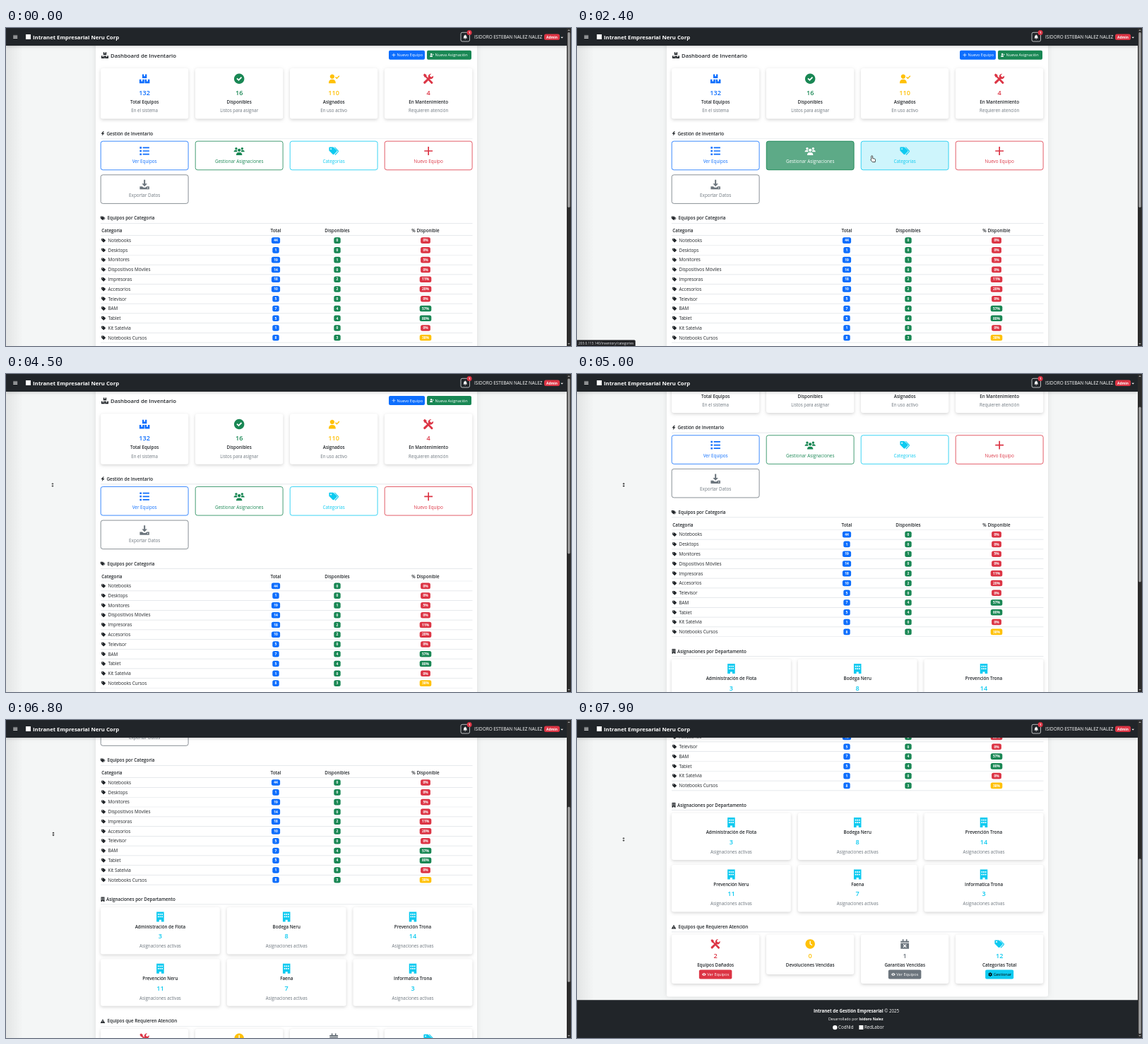
Animation of 800 by 450 pixels, one loop 8 s. Source, as an HTML page with a canvas:

```html
<!DOCTYPE html>
<html lang="es">
<head>
<meta charset="utf-8">
<title>Inventario</title>
<style>
html, body { margin: 0; width: 100%; height: 100%; overflow: hidden; background: #f4f6f6; }
canvas { display: block; width: 800px; height: 450px; }
</style>
</head>
<body>
<canvas id="stage" width="800" height="450"></canvas>
<script>
const ctx = document.getElementById('stage').getContext('2d');
const LOOP = 8000, MAX_SCROLL = 345.4;
const BLUE = '#0d6efd', GREEN = '#198754', YELLOW = '#ffc107', RED = '#dc3545',
  CYAN = '#0dcaf0', GRAY = '#6c757d', DARK = '#212529', LINE = '#dee2e6', WHITE = '#fff';
const COLS = [134, 268, 402, 536], CARD_W = 124.3;

// Icons live in a 16-unit box; "|" separates layers that overlap.
const user = 'M5.5 1a3.5 3.5 0 1 0 .01 0zM0 15c0-4 2-6 5.5-6s5.5 2 5.5 6z';
const ICONS = {
  boxes: 'M4.5 1H7v3h2V1h2.5v6h-7zM0 9h2.8v3h2V9h2.8v6H0zM8.4 9h2.8v3h2V9H16v6H8.4z',
  check: 'M8 0a8 8 0 1 0 .01 0zM3.8 8.2l1.4-1.4 2 2L11 5l1.4 1.4-5.2 5.2z',
  userCheck: user + 'M10 6l1.2-1.2 1.6 1.6L16 3l1 1.2-4.2 4.4z',
  userPlus: user + 'M12.2 4h1.6v2H16v1.6h-2.2v2h-1.6v-2H10V6h2.2z',
  tools: 'M2 0l3 2.2v2l9.5 9a1.5 1.5 0 0 1-2.4 2.2L3.4 5.6H2L0 2z|M15.6 3.2L13 5.4l-2.2-.8-.6-2.2L12.6.2a4.4 4.4 0 0 0-4.8 6l-7 6.4a1.8 1.8 0 0 0 2.6 2.6L10 8.4a4.4 4.4 0 0 0 5.6-5.2z',
  bolt: 'M10 0L2 9h5l-2 7 9-9.5H9L12 0z',
  list: 'M0 1h3v3H0zM5 1.5h11v2H5zM0 6.5h3v3H0zM5 7h11v2H5zM0 12h3v3H0zM5 12.5h11v2H5z',
  users: 'M3 2a2 2 0 1 0 .01 0zM13 2a2 2 0 1 0 .01 0zM8 4a2.6 2.6 0 1 0 .01 0zM-1 9.5c0-2 1-3 3-3h2l1 3zM17 9.5c0-2-1-3-3-3h-2l-1 3zM3 15c0-3 1.5-4.5 4-4.5h2c2.5 0 4 1.5 4 4.5z',
  tag: 'M0 2v6l7 7h2l6-6V7L8 1H1zM3.5 3.3a1.2 1.2 0 1 0 .01 0z',
  tags: 'M0 2v5.5L6.5 14H8l5.3-5.3V7L7 1.5H.8zM3.2 3.5a1.1 1.1 0 1 0 .01 0z|M10 1.5l6 6.3v1.4L10.6 15l-1-1 5-5.2v-.6l-6-6.7z',
  plus: 'M7 1h2v6h6v2H9v6H7V9H1V7h6z',
  download: 'M6.8 0h2.4v6.5h3.3L8 11 3.5 6.5h3.3zM0 11h4l2.5 2h3L12 11h4v5H0zM12.5 13H14v1.3h-1.5z',
  building: 'M2 0h12v16H9.8v-3H6.2v3H2zM4 3h2v2H4zM7 3h2v2H7zM10 3h2v2h-2zM4 7h2v2H4zM7 7h2v2H7zM10 7h2v2h-2z',
  warn: 'M8 1l8 14H0zM7.2 5.5h1.6v5H7.2zM7.2 11.7h1.6v1.6H7.2z',
  clock: 'M8 0a8 8 0 1 0 .01 0zM7.2 3h1.6v4.6l3 2-1 1.2-3.6-2.4z',
  calendar: 'M1 3h3V0h2v3h4V0h2v3h3v2.5H1zM1 6.5h14V16H1zM6 8.2l2 2 2-2 1 1-2 2 2 2-1 1-2-2-2 2-1-1 2-2-2-2z',
  eye: 'M0 8c4-7 12-7 16 0-4 7-12 7-16 0zM8 4.6a3.4 3.4 0 1 0 .01 0zM8 6.4a1.6 1.6 0 1 0 .01 0z',
  gear: 'M6.5 0h3l.5 2.5 2 1 2.5-.8L16 5.3 14 7v2l2 1.7-1.5 2.6-2.5-.8-2 1-.5 2.5h-3L6 13.5l-2-1-2.5.8L0 10.7 2 9V7L0 5.3l1.5-2.6 2.5.8 2-1zM8 5.5a2.5 2.5 0 1 0 .01 0z',
  bell: 'M7 0h2v1.5c3 .5 4 2.5 4 5 0 3 .8 4 2 5.5H1c1.2-1.5 2-2.5 2-5.5 0-2.5 1-4.5 4-5zM6 13.5h4a2 2 0 0 1-4 0z',
  menu: 'M0 2h16v2.2H0zM0 7h16v2.2H0zM0 12h16v2.2H0z'
};
for (const k in ICONS) ICONS[k] = ICONS[k].split('|').map(d => new Path2D(d));
const ARROW = new Path2D('M0 0v11l2.6-2.4 1.6 3.7 1.7-.7L4.3 8H8z');
const HAND = new Path2D('M3 0c1 0 1.3.6 1.3 1.3V5l4 1c1 .3 1.4 1 1.2 2L9 12H4L.6 8.2C.2 7.4 1 6.8 1.7 7.2V1.3C1.7.6 2 0 3 0z');

function icon(name, x, y, size, color) {
  ctx.save();
  ctx.translate(x - size / 2, y - size / 2);
  ctx.scale(size / 16, size / 16);
  ctx.fillStyle = color;
  ICONS[name].forEach(p => ctx.fill(p, 'evenodd'));
  ctx.restore();
}

function setFont(size, weight) {
  ctx.font = `${weight} ${size}px "Open Sans", "Noto Sans", sans-serif`;
}

// y is the middle of the capitals
function text(str, x, y, size, color = DARK, weight = 400, align = 'left') {
  setFont(size, weight);
  ctx.fillStyle = color;
  ctx.textAlign = align;
  ctx.fillText(str, x, y + size * 0.36);
  return ctx.measureText(str).width;
}
const centered = (str, x, y, size, color, weight) => text(str, x, y, size, color, weight, 'center');

function box(x, y, w, h, r, color) {
  ctx.fillStyle = color;
  ctx.beginPath();
  ctx.roundRect(x, y, w, h, r);
  ctx.fill();
}

function shadowed(blur, dy, alpha, draw) {
  ctx.save();
  ctx.shadowColor = `rgba(0,0,0,${alpha})`;
  ctx.shadowBlur = blur;
  ctx.shadowOffsetY = dy;
  draw();
  ctx.restore();
}
const card = (x, y, w, h) => shadowed(4, 1.5, 0.17, () => box(x, y, w, h, 3, WHITE));

function badge(str, x, y, color) {
  setFont(4.9, 700);
  const w = ctx.measureText(str).width + 6.6;
  box(x - w / 2, y - 4.3, w, 8.6, 2.5, color);
  centered(str, x, y, 4.9, WHITE, 700);
}

const rule = y => box(134, y - 0.35, 526.5, 0.7, 0, LINE);

function section(name, title, x, y) {
  icon(name, 137, y, 6.6, DARK);
  text(title, x, y, 6.3, DARK, 600);
  rule(y + 7.2);
}

function smallButton(name, label, x, y, w, color, ink = WHITE) {
  box(x, y, w, 13, 2, color);
  icon(name, x + 7, y + 6.5, 5.6, ink);
  text(label, x + 11.5, y + 6.5, 5.6, ink);
}

const HOST = '203.0.113.140/inventory/';
const LINKS = [
  ['list', 'Ver Equipos', BLUE, 'equipment'],
  ['users', 'Gestionar Asignaciones', GREEN, 'assignments'],
  ['tags', 'Categorías', CYAN, 'categories'],
  ['plus', 'Nuevo Equipo', RED, 'equipment/create'],
  ['download', 'Exportar Datos', GRAY, 'export/equipment']
].map(([name, label, color, path], i) =>
  ({ name, label, color, path, x: COLS[i % 4], y: i < 4 ? 160 : 207.6, h: 41 }));
const CARD_LINK = { x: 134, y: 57, h: 72, path: 'equipment' };

const STATS = [
  ['boxes', '132', 'Total Equipos', 'En el sistema', BLUE],
  ['check', '16', 'Disponibles', 'Listos para asignar', GREEN],
  ['userCheck', '110', 'Asignados', 'En uso activo', YELLOW],
  ['tools', '4', 'En Mantenimiento', 'Requieren atención', RED]
];
const ROWS = [
  ['Notebooks', 44, 0], ['Desktops', 1, 0], ['Monitores', 19, 1], ['Dispositivos Móviles', 14, 0],
  ['Impresoras', 18, 2], ['Accesorios', 10, 2], ['Televisor', 5, 0], ['BAM', 7, 4],
  ['Tablet', 5, 4], ['Kit Satelvia', 1, 0], ['Notebooks Cursos', 8, 3]
];
const DEPARTMENTS = [
  ['Administración de Flota', 3], ['Bodega Neru', 8], ['Prevención Trona', 14],
  ['Prevención Neru', 11], ['Faena', 7], ['Informatica Trona', 3]
];
const ALERTS = [
  ['tools', '2', 'Equipos Dañados', RED, 'Ver Equipos'],
  ['clock', '0', 'Devoluciones Vencidas', YELLOW],
  ['calendar', '1', 'Garantías Vencidas', GRAY, 'Ver Equipos'],
  ['tags', '12', 'Categorías Total', CYAN, 'Gestionar']
];

// Pointer stops: time, x, y
const STOPS = [
  [500, 733, 20], [1000, 480, 90], [1500, 241, 118], [1750, 241, 119], [2000, 225, 175],
  [2250, 330, 182], [2500, 464, 180], [2700, 590, 182], [2850, 560, 206], [3050, 400, 225],
  [3300, 155, 231], [3600, 155, 232], [4300, 66, 156], [4450, 66, 157], [5650, 66.3, 156.5],
  [5900, 66.3, 156.5], [6100, 71, 133], [6300, 67, 158], [6450, 67, 159], [7400, 67, 166.5], [7900, 66, 169]
];

function pointer(t) {
  if (t < STOPS[0][0]) return null;
  const i = STOPS.findIndex(s => s[0] > t);
  if (i < 0) return STOPS[STOPS.length - 1].slice(1);
  const [t0, x0, y0] = STOPS[i - 1], [t1, x1, y1] = STOPS[i];
  const p = (t - t0) / (t1 - t0), e = p * p * (3 - 2 * p);
  return [x0 + (x1 - x0) * e, y0 + (y1 - y0) * e];
}

function linkAt(t) {
  const p = t < 4400 && pointer(t);
  if (!p) return null;
  return [CARD_LINK, ...LINKS].find(l =>
    p[0] > l.x && p[0] < l.x + CARD_W && p[1] > l.y && p[1] < l.y + l.h) || null;
}

// Share of the last 150 ms the pointer spent on the link
function hover(link, t) {
  let n = 0;
  for (let i = 0; i < 10; i++) if (linkAt(t - i * 15) === link) n++;
  return n / 10;
}

function scrollAt(t) {
  if (t < 4450) return 0;
  if (t < 6450) {
    const s = Math.min(t - 4450, 1202) / 1000, ramp = 0.36;
    return s < ramp ? 198 * s * s / (2 * ramp) : 198 * (s - ramp / 2);
  }
  const s = (t - 6450) / 1000;
  return Math.min(MAX_SCROLL, 202.3 + 79 * s * s);
}

function drawActions(t) {
  for (const l of LINKS) {
    const k = hover(l, t), cx = l.x + CARD_W / 2;
    const ink = k > 0.5 ? (l.color === CYAN ? '#000' : WHITE) : l.color;
    ctx.globalAlpha = k;
    box(l.x, l.y, CARD_W, l.h, 3, l.color);
    ctx.globalAlpha = 1;
    ctx.strokeStyle = l.color;
    ctx.lineWidth = 0.8;
    ctx.beginPath();
    ctx.roundRect(l.x + 0.2, l.y + 0.2, CARD_W - 0.4, l.h - 0.4, 3);
    ctx.stroke();
    icon(l.name, cx, l.y + 14, 13.5, ink);
    centered(l.label, cx, l.y + 29, 6.3, ink);
  }
}

function drawTable() {
  section('tags', 'Equipos por Categoría', 143.5, 269.2);
  text('Categoría', 135.3, 287, 6.3, DARK, 600);
  centered('Total', 382, 287, 6.3, DARK, 600);
  centered('Disponibles', 469, 287, 6.3, DARK, 600);
  centered('% Disponible', 594, 287, 6.3, DARK, 600);
  rule(293.7);
  ROWS.forEach(([name, total, free], i) => {
    const y = 300.6 + 13.77 * i, pct = Math.round(100 * free / total);
    icon('tag', 138.2, y, 6.2, DARK);
    text(name, 144.5, y, 6.4);
    badge(total, 382, y, BLUE);
    badge(free, 469, y, GREEN);
    badge(pct + '%', 594, y, pct > 50 ? GREEN : pct > 20 ? YELLOW : RED);
    rule(y + 6.9);
  });
}

function drawFooter() {
  box(0, 741.6, 794, 60, 0, DARK);
  const bold = 'Intranet de Gestión Empresarial';
  const w = text(bold, 335, 757, 6.2, WHITE, 700);
  text(' © 2025', 335 + w, 757, 6.2, WHITE);
  const d = text('Desarrollado por ', 356, 768, 5.3, WHITE);
  text('Isidoro Nalez', 356 + d, 768, 5.3, WHITE, 700);
  ctx.fillStyle = WHITE;
  ctx.beginPath();
  ctx.arc(365.3, 780.5, 3.2, 0, 7);
  ctx.fill();
  text('CodNid', 370, 780.5, 6.2, WHITE);
  box(399.4, 777.5, 6, 6, 0.5, WHITE);
  text('RedLabor', 407, 780.5, 6.2, WHITE);
}

function drawPage(t) {
  shadowed(7, 0, 0.1, () => box(127, -20, 540, 757, 3, WHITE));
  icon('boxes', 140, 38.7, 10, DARK);
  text('Dashboard de Inventario', 148, 38.8, 7.75, DARK, 600);
  smallButton('plus', 'Nuevo Equipo', 542, 31.7, 51, BLUE);
  smallButton('userPlus', 'Nueva Asignación', 596, 31.7, 63, GREEN);

  STATS.forEach(([name, value, label, note, color], i) => {
    const cx = COLS[i] + CARD_W / 2;
    card(COLS[i], 57, CARD_W, 71.5);
    icon(name, cx, 71.8, 14.5, color);
    centered(value, cx, 91.3, 9.1, color, 600);
    centered(label, cx, 104.8, 6.25, DARK, 600);
    centered(note, cx, 117, 6.2, GRAY);
  });

  section('bolt', 'Gestión de Inventario', 142.5, 149.3);
  drawActions(t);
  drawTable();

  section('building', 'Asignaciones por Departamento', 142, 465.8);
  DEPARTMENTS.forEach(([name, count], i) => {
    const x = 134 + 178.8 * (i % 3), cx = x + 84.4, y = 477 + 73.4 * Math.floor(i / 3);
    card(x, y, 168.8, 66.5);
    icon('building', cx, y + 13.5, 14, CYAN);
    centered(name, cx, y + 27.5, 6.25, DARK, 600);
    centered(count, cx, y + 41.2, 9.1, CYAN, 600);
    centered('Asignaciones activas', cx, y + 55.2, 6.2, GRAY);
  });

  section('warn', 'Equipos que Requieren Atención', 143.5, 638.1);
  ALERTS.forEach(([name, value, label, color, action], i) => {
    const cx = COLS[i] + CARD_W / 2;
    card(COLS[i], 649, CARD_W, action ? 69.5 : 56.5);
    icon(name, cx, 662.3, 13.5, color);
    centered(value, cx, 678.8, 9.1, color, 600);
    centered(label, cx, 692, 6.25, DARK, 600);
    if (action === 'Gestionar') smallButton('gear', action, cx - 20, 699, 40, CYAN, '#000');
    else if (action) smallButton('eye', action, cx - 23.3, 699, 46.5, color);
  });
  drawFooter();
}

function drawNavbar() {
  shadowed(4, 1, 0.2, () => box(0, 0, 794, 25, 0, DARK));
  icon('menu', 13.2, 12.7, 6, WHITE);
  box(28, 9, 7, 7, 0, WHITE);
  text('Intranet Empresarial Neru Corp', 38, 13, 7.75, WHITE, 700);
  ctx.strokeStyle = '#f8f9fa';
  ctx.lineWidth = 0.7;
  ctx.beginPath();
  ctx.roundRect(644, 6.3, 12.5, 12.7, 2);
  ctx.stroke();
  icon('bell', 650.2, 12.8, 6.4, WHITE);
  box(652.6, 3, 7, 7, 3.5, RED);
  centered('1', 656.1, 6.5, 4.2, WHITE, 700);
  text('ISIDORO ESTEBAN NALEZ NALEZ', 663, 12.8, 6.4, WHITE);
  box(762, 8.6, 22, 8.4, 2.5, RED);
  centered('Admin', 773, 12.8, 4.9, WHITE, 700);
  triangle(787.2, 13.6, 1.9, 1, WHITE);
}

function triangle(x, y, r, dir, color) {
  ctx.fillStyle = color;
  ctx.beginPath();
  ctx.moveTo(x - r, y - dir * r / 2);
  ctx.lineTo(x + r, y - dir * r / 2);
  ctx.lineTo(x, y + dir * r / 2);
  ctx.fill();
}

function drawScrollbar(scroll) {
  box(794, 0, 6, 450, 0, '#2c2c2c');
  box(795.3, 6 + scroll * 0.551, 3.4, 248, 1.7, '#9f9f9f');
  triangle(797, 3, 1.8, -1, '#9f9f9f');
  triangle(797, 447, 1.8, 1, '#9f9f9f');
}

function drawStatus(t) {
  let link = null;
  for (let d = 0; d <= 250 && !link; d += 25) link = linkAt(t - d);
  if (!link) return;
  setFont(4.75, 400);
  const url = HOST + link.path;
  box(0, 441.5, ctx.measureText(url).width + 4.5, 8.5, [0, 1.5, 0, 0], '#202124');
  text(url, 2, 446, 4.75, '#e8eaed');
}

function drawPointer(t) {
  const p = pointer(t);
  if (!p) return;
  const [x, y] = p;
  if ((t > 4450 && t < 5652) || t > 6450) {
    triangle(x, y - 2, 1.7, -1, '#111');
    triangle(x, y + 2, 1.7, 1, '#111');
    box(x - 0.6, y - 0.6, 1.2, 1.2, 0.6, '#111');
    return;
  }
  const hand = linkAt(t), shape = hand ? HAND : ARROW, k = hand ? 0.75 : 0.62;
  ctx.save();
  ctx.translate(hand ? x - 2.2 : x, y);
  ctx.scale(k, k);
  ctx.fillStyle = WHITE;
  ctx.strokeStyle = '#111';
  ctx.lineWidth = 1;
  ctx.fill(shape);
  ctx.stroke(shape);
  ctx.restore();
}

function draw(t) {
  const scroll = scrollAt(t);
  ctx.fillStyle = '#f4f6f6';
  ctx.fillRect(0, 0, 800, 450);
  const edge = ctx.createLinearGradient(0, 0, 24, 0);
  edge.addColorStop(0, 'rgba(0,0,0,.07)');
  edge.addColorStop(1, 'rgba(0,0,0,0)');
  ctx.fillStyle = edge;
  ctx.fillRect(0, 25, 24, 425);
  ctx.save();
  ctx.translate(0, -scroll);
  drawPage(t);
  ctx.restore();
  drawNavbar();
  drawScrollbar(scroll);
  drawStatus(t);
  drawPointer(t);
}

const start = performance.now();
function tick() {
  draw((performance.now() - start) % LOOP);
  requestAnimationFrame(tick);
}
tick();
</script>
</body>
</html>
```
